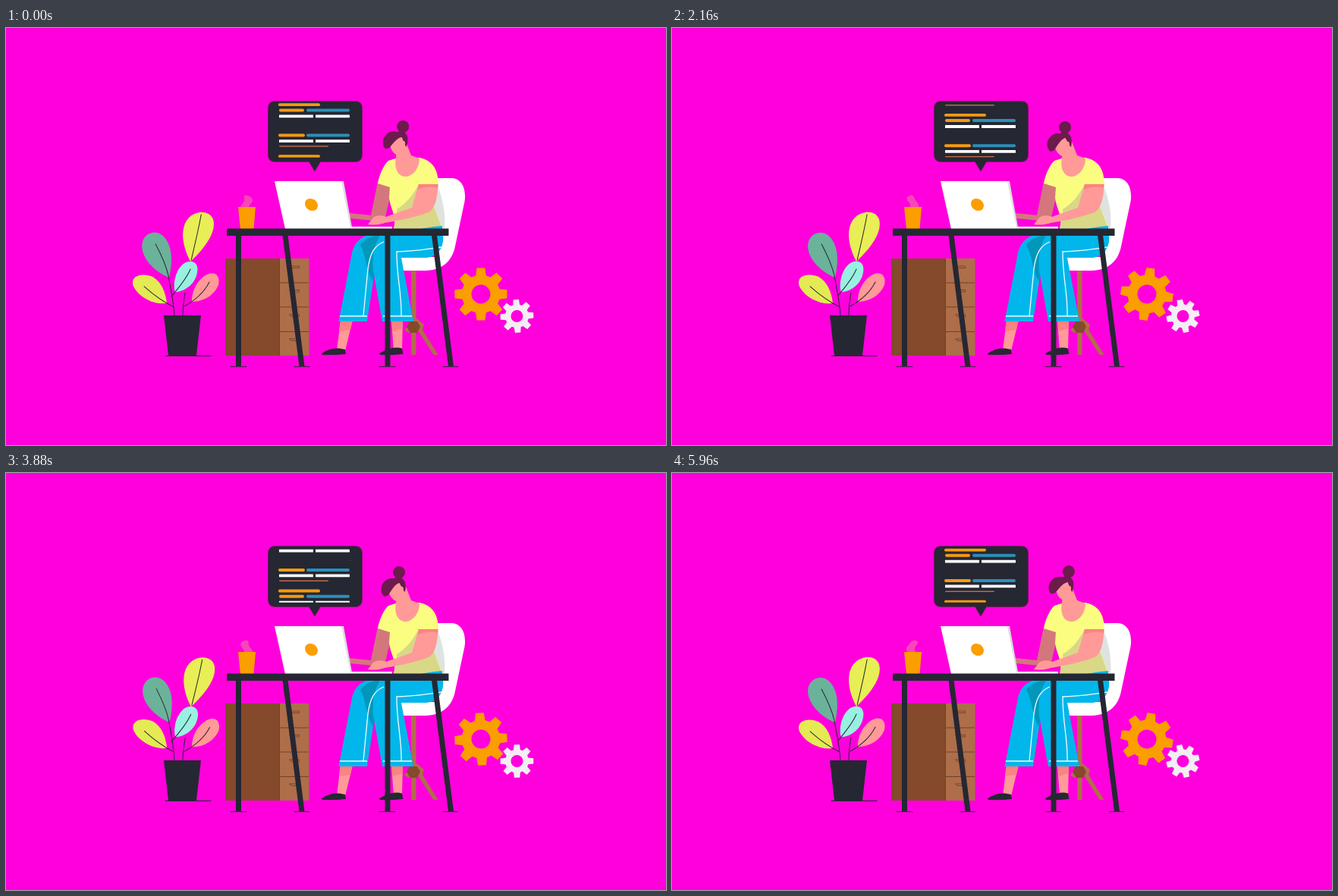
Recreate the animation shown at these times as an HTML page. Size 870 px wide and 550 px high, loop 6 s.

```html
<!DOCTYPE html>
<html lang="en">
<head>
<meta charset="utf-8">
<title>Working at the desk</title>
<style>
  html, body { margin: 0; width: 100%; height: 100%; overflow: hidden; background: #ff00dc; }
  svg { display: block; width: 870px; height: 550px; }
  .ink { fill: #252733; }
  .line { fill: none; stroke: #252733; stroke-width: 1; stroke-linecap: round; }
  .skin { fill: #ff9a98; }
  .band { fill: #fb8381; }
  .jeans { fill: #00b6ea; }
  .seam { fill: none; stroke: #f4fbff; stroke-width: 1.3; }
  .wood { fill: #b06e48; }
  .hair { fill: #6b1b4c; }
  .orange { fill: #fb9e00; }
  .white { fill: #fff; }
</style>
</head>
<body>
<svg viewBox="0 0 870 550" xmlns="http://www.w3.org/2000/svg">
  <defs>
    <clipPath id="screen"><rect x="346" y="98.5" width="123" height="72.3"/></clipPath>
  </defs>
  <rect width="870" height="550" fill="#ff00dc"/>

  <!-- code bubble -->
  <path d="M355 96.500H460Q469.500 96.500 469.500 106V167Q469.500 176.500 460 176.500H414.500L407 189L399.500 176.500H355Q345.500 176.500 345.500 167V106Q345.500 96.500 355 96.500Z" fill="#252733" stroke="#7c1466"/>
  <g clip-path="url(#screen)"><g id="code"></g></g>

  <!-- plant -->
  <g id="plant">
    <path fill="#e8ee55" d="M243 308C231 286 229 262 241 250C251 240 269 240 273 253C277 269 263 289 243 308Z"/>
    <path fill="#6bb29b" d="M215 329C195 321 179 304 179 287C180 269 200 264 210 278C220 291 219 311 215 329Z"/>
    <path fill="#e4ea53" d="M212 363C193 366 171 352 167 338C165 325 182 323 193 328C205 335 210 348 212 363Z"/>
    <path fill="#98f0e1" d="M223 348.500C219 335 225 315 237 309C248 305 254 312 252 322C250 336 238 347 223 348.500Z"/>
    <path fill="#ff9a98" d="M245 361C244 345 255 328 268 324C279 321 283 332 279 341C273 353 260 361 245 361Z"/>
    <path class="line" d="M257 246C253 268 249 285 244 306M236 349C234 360 233 370 233 379M197 285C205 300 211 313 214 327C217 345 221 360 222 379M182 341C192 350 203 359 221 368M243 318C238 330 230 340 218 354M268 335C262 347 253 357 235 367"/>
  </g>
  <path class="ink" d="M208 379H257L251 432H214Z"/>
  <path class="line" d="M210 432.500H270"/>

  <!-- drawers -->
  <rect x="289" y="304" width="72" height="128" fill="#844a2b"/>
  <rect x="360" y="304" width="39.500" height="128" fill="#ad6e49"/>
  <path d="M360.500 304V432M360 336H399M360 368H399M360 400.500H399" stroke="#754026" fill="none"/>
  <g id="handles" fill="none" stroke="#6b3a24" stroke-width="0.8"></g>

  <!-- cup -->
  <path id="steam" fill="#f846b8"/>
  <path class="orange" d="M306 236H329L326.500 265H309Z"/>

  <!-- chair -->
  <path class="wood" d="M534 318H540.500V431H534.500ZM541 383L551 391L549 398L569.500 431H563.500L543 399L530 402L525 398Z"/>
  <path d="M532 387H542L546 394L542 402H533L528 394Z" fill="#844a2b"/>
  <path class="white" d="M566 198H588C602 199 607 214 604.500 229L592 288C588 308 575 319 553 320H521V302H566Z"/>
  <path d="M567 203C574 220 580 240 578 264H560V230Z" fill="#dfe3df"/>

  <!-- legs -->
  <path class="skin" d="M441 385H457L447 426H436ZM508 385H523L522 425H511Z"/>
  <path class="band" d="M441 385H457L454 398L439 400ZM508 385H523L522.500 396L510 400Z"/>
  <path class="ink" d="M416 429.500C423 424 434 420 447 424L448 430Q432 432 417 431ZM492 429.500C499 425 511 419 522 422.500L523.500 430Q508 432 493 431Z"/>
  <path class="jeans" d="M438.500 387L455 302C457 286 465 276 480 272H513L485 328L476 387Z"/>
  <path d="M467 286C474 277 486 272 504 272L488 304L484 335C475 322 475 300 467 286Z" fill="#0097ba"/>
  <path class="jeans" d="M494 272H576C578 289 570 301 555 303H521L537 387H496L484 320C482 297 487 283 494 272Z"/>
  <path class="seam" d="M440 380H476M471 380L477 318C480 296 486 287 498 282M497 380H535M576 289C557 291 538 295 515 295C515 330 522 352 521 380"/>

  <!-- body -->
  <path fill="#d3777c" d="M490 203L508 210L506 224L498 258L484 254L453 251L451 244L481 247Z"/>
  <path fill="#fbfd80" d="M517 171H545C560 174 570 184 570 207L562 230L575 264H511C516 249 506 237 505 224L506 210L490 205C492 194 497 182 504 175Z"/>
  <path fill="#d8d887" d="M544 206C536 221 528 231 515 239C516 249 513 256 511 265H575L562 230L560 206Z"/>
  <path class="jeans" d="M537 266C548 265 561 262 575 261V267H537Z"/>
  <path class="skin" d="M514 171C511 187 518 197 528 196C538 194 545 184 545 172L534 168L527 150H516Z"/>

  <g id="head">
    <circle class="hair" cx="523.500" cy="130" r="8"/>
    <path class="skin" d="M506 151L517 140H528L529 158L534 171L516 168C510 165 507 160 506 151Z"/>
    <path class="hair" d="M500 159C495 154 496 145 502 140C506 136 512 136 516 137C521 134 528 137 529.500 144C530 150 529 154 527.500 157L525 152L522 144C515 145 510 153 505 158Z"/>
    <ellipse class="skin" cx="524.500" cy="152" rx="1.800" ry="3"/>
  </g>

  <!-- laptop -->
  <path fill="#dcdde1" d="M440 202H445L456.500 265H450Z"/>
  <path class="white" d="M354 202H442L454.500 265H368ZM455 262H509V265H455Z"/>
  <ellipse class="orange" cx="402.500" cy="233" rx="9" ry="7.500" transform="rotate(35 402.500 233)"/>

  <!-- near arm -->
  <path class="skin" d="M544 206H569.500C569 223 566 236 559 242C543 249 519 254 499 257C491 260 483 260 477 259L484 250C489 246 496 247 501 249L535 237Z"/>
  <path class="band" d="M544 206H569.500L569 211C560 208 552 210 543 213Z"/>

  <!-- desk -->
  <path class="ink" d="M291 264.500H583.500V274H291ZM303 273H310V446H303ZM364.500 273H371.500L393.500 446H386.500ZM499.500 273H506.500V446H499.500ZM561 273H568L590 446H583Z"/>
  <path class="line" d="M296 446.700H317M380 446.700H400M492 446.700H513M576 446.700H596"/>

  <path id="bigGear" class="orange" fill-rule="evenodd"/>
  <path id="smallGear" fill="#f3eef3" fill-rule="evenodd"/>
</svg>
<script>
const LOOP = 6000, FRAME = 40;
const PERIOD = 68, SCROLL = 3020;
const $ = id => document.getElementById(id);

const ORANGE = '#f39a12', BLUE = '#2b8fb8', WHITE = '#ffffff', RUST = '#bd6a45';
// y offset, thickness, then bars as [x, width, colour]
const ROWS = [
  [0, 4, [359, 35, ORANGE], [396, 57, BLUE]],
  [7.5, 3.8, [360, 45, WHITE], [408, 45, WHITE]],
  [14.4, 1.5, [360, 65, RUST]],
  [27.6, 3.8, [359, 55, ORANGE]],
  [34.8, 4, [360, 33, ORANGE], [396, 57, BLUE]],
  [42.7, 3.8, [360, 45, WHITE], [408, 45, WHITE]]
];

function codeMarkup() {
  let out = '';
  for (let copy = -1; copy < 3; copy++)
    for (const [y, h, ...bars] of ROWS)
      for (const [x, w, color] of bars)
        out += `<rect x="${x}" y="${copy * PERIOD + y - h / 2}" width="${w}" height="${h}" rx="${color === WHITE ? 0.5 : h / 2}" fill="${color}"/>`;
  return out;
}

function gearPath(body, outer, hole, base, tip) {
  const points = [];
  const root = Math.sqrt(body * body - base * base);
  for (let i = 0; i < 8; i++) {
    const a = i * Math.PI / 4, c = Math.cos(a), s = Math.sin(a);
    for (const [x, y] of [[-base, -root], [-tip, -outer], [tip, -outer], [base, -root]])
      points.push((x * c - y * s).toFixed(2) + ' ' + (x * s + y * c).toFixed(2));
  }
  return `M${points.join('L')}ZM${-hole} 0a${hole} ${hole} 0 1 0 ${2 * hole} 0a${hole} ${hole} 0 1 0 ${-2 * hole} 0Z`;
}

function steamPath(t) {
  const left = [], right = [];
  for (let i = 0; i <= 16; i++) {
    const k = i / 16, y = 237 - 16.5 * k;
    const x = 317 + 2.6 * Math.sin(5 * k + 2 * Math.PI * t / 1587 - 1.5);
    const half = 5.5 * Math.sqrt(1 - Math.pow(k, 6));
    left.push(`${(x - half).toFixed(2)} ${y}`);
    right.unshift(`${(x + half).toFixed(2)} ${y}`);
  }
  return `M${left.concat(right).join('L')}Z`;
}

const ease = p => (1 - Math.cos(Math.PI * Math.min(1, Math.max(0, p)))) / 2;

function headTilt(t) {
  const lean = t < 3500 ? 1 - ease((t - 700) / 1500) : ease((t - 4700) / 1800);
  return -8 + 9 * (t < 700 ? 0.85 + 0.15 * t / 700 : lean);
}

function draw(t) {
  const p = (t % SCROLL) / SCROLL;
  const scroll = PERIOD * (0.85 * ease(p) + 0.15 * p);
  $('code').setAttribute('transform', `translate(0 ${(141.6 - scroll).toFixed(2)})`);
  const sway = 0.45 * (1 + Math.cos(2 * Math.PI * (t - 460) / 1200));
  $('plant').setAttribute('transform', `rotate(${sway} 228 379)`);
  $('head').setAttribute('transform', `rotate(${headTilt(t)} 528 169)`);
  $('steam').setAttribute('d', steamPath(t));
  const turn = 0.0587 * t;
  $('bigGear').setAttribute('transform', `translate(626 351) rotate(${-turn})`);
  $('smallGear').setAttribute('transform', `translate(673.5 380) rotate(${turn - 3})`);
}

$('code').innerHTML = codeMarkup();
$('handles').innerHTML = [314, 345.5, 378, 410]
  .map(y => `<path d="M373.500 ${y}H386.500V${y + 2.5}H376.500Z"/>`).join('');
$('bigGear').setAttribute('d', gearPath(25.5, 34.5, 12.5, 6.8, 5.4));
$('smallGear').setAttribute('d', gearPath(15.5, 21.8, 8, 4.4, 3.7));

const start = performance.now();
function tick() {
  const t = (performance.now() - start) % LOOP;
  draw(Math.floor(t / FRAME) * FRAME);
  requestAnimationFrame(tick);
}
draw(0);
requestAnimationFrame(tick);
</script>
</body>
</html>
```
